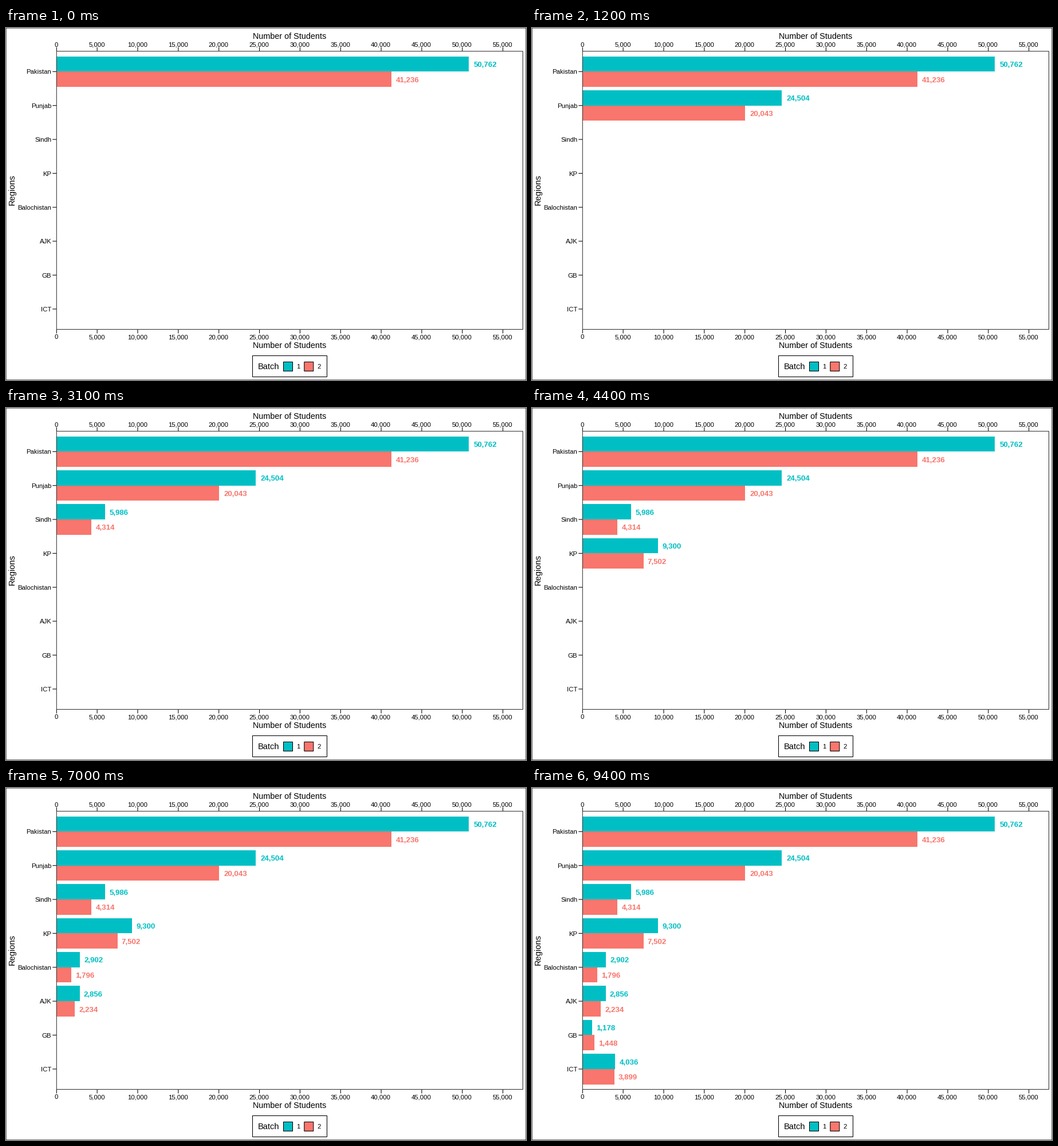
These frames come from a looping animation (908x616 px, 10000 ms). A matplotlib script:

```python
import matplotlib.pyplot as plt
from matplotlib.animation import FuncAnimation
from matplotlib.patches import Rectangle

W, H, DPI = 908, 616, 64
PT = 72 / DPI  # points per pixel
TEAL, CORAL, INK, BORDER = "#00BFC4", "#F8766D", "black", "#333333"
LINE = 1.07

LEFT, RIGHT, TOP, BOTTOM = 88.3, 902.5, 40.67, 527.43
TICK_STEP = 70.85  # pixels per 5,000 students
ROW_STEP = (BOTTOM - TOP) / 8.2
ROW_TOP = TOP + 0.6 * ROW_STEP
BAR = 0.45 * ROW_STEP
TICK_LEN = 7
TITLE, AXIS, VALUE = 14.67, 11.4, 13.3

# region, batch 1, batch 2, time of appearance in ms
ROWS = [
    ("Pakistan", 50762, 41236, 0),
    ("Punjab", 24504, 20043, 1200),
    ("Sindh", 5986, 4314, 2500),
    ("KP", 9300, 7502, 3800),
    ("Balochistan", 2902, 1796, 5100),
    ("AJK", 2856, 2234, 6400),
    ("GB", 1178, 1448, 7600),
    ("ICT", 4036, 3899, 8800),
]
LOOP, INTERVAL = 10000, 100

plt.rcParams["font.family"] = "Liberation Sans"
fig = plt.figure(figsize=(W / DPI, H / DPI), dpi=DPI, facecolor="white")
ax = fig.add_axes([0, 0, 1, 1])
ax.set(xlim=(0, W), ylim=(H, 0))
ax.axis("off")


def text(x, y, s, size, **kw):
    kw.setdefault("va", "baseline")
    return ax.text(x, y, s, fontsize=size * PT, **kw)


def line(x0, y0, x1, y1):
    ax.plot([x0, x1], [y0, y1], color=INK, lw=LINE * PT,
            solid_capstyle="butt", snap=False)


def box(x0, y0, x1, y1, edge=INK, fill="none"):
    ax.add_patch(Rectangle((x0, y0), x1 - x0, y1 - y0, ec=edge, fc=fill,
                           lw=LINE * PT, zorder=3, snap=False,
                           joinstyle="miter"))


def draw_axes():
    box(0, 0, W, H)
    box(LEFT, TOP, RIGHT, BOTTOM, edge=BORDER)
    for i in range(12):
        x = LEFT + i * TICK_STEP
        line(x, TOP - TICK_LEN, x, TOP)
        line(x, BOTTOM, x, BOTTOM + TICK_LEN)
        for y in (33, 544):
            text(x - 0.5, y, f"{5000 * i:,}", AXIS, ha="center")
    for y in (19, 560):
        text(495.4, y, "Number of Students", 14.4, ha="center")
    text(11.2, 282.5, "Regions", TITLE, rotation=90, ha="center", va="center")


def draw_legend():
    box(430.5, 573.5, 560.5, 610.5)
    text(440, 597, "Batch", TITLE)
    for x, color, name in ((484.5, TEAL, "1"), (520.8, CORAL, "2")):
        box(x, 584.4, x + 16, 600.4, fill=color)
        text(x + 22.8, 596.5, name, AXIS)


def draw_bar(y, value, color):
    """Return a bar with its value label; y is the bar's upper edge."""
    width = value / 5000 * TICK_STEP
    bar = Rectangle((LEFT, y), width, BAR, fc=color, lw=0, snap=True)
    ax.add_patch(bar)
    label = f"{value:,}"
    label_width = VALUE * (0.556 * (len(label) - 1) + 0.278)
    return [bar, text(LEFT + width + 0.2 * label_width + 0.4,
                      y + BAR / 2 + 5.1, label, VALUE,
                      color=color, weight="bold")]


def draw_row(index, name, first, second):
    y = ROW_TOP + index * ROW_STEP
    line(LEFT - TICK_LEN, y, LEFT, y)
    text(79.3, y + 4.2, name, AXIS, ha="right")
    return draw_bar(y - BAR, first, TEAL) + draw_bar(y, second, CORAL)


draw_axes()
draw_legend()
groups = [(start, draw_row(i, name, a, b))
          for i, (name, a, b, start) in enumerate(ROWS)]


def update(frame):
    now = frame * INTERVAL
    for start, artists in groups:
        for artist in artists:
            artist.set_visible(now >= start)
    return []


anim = FuncAnimation(fig, update, frames=LOOP // INTERVAL, interval=INTERVAL,
                     repeat=True, repeat_delay=0)
plt.show()
```
